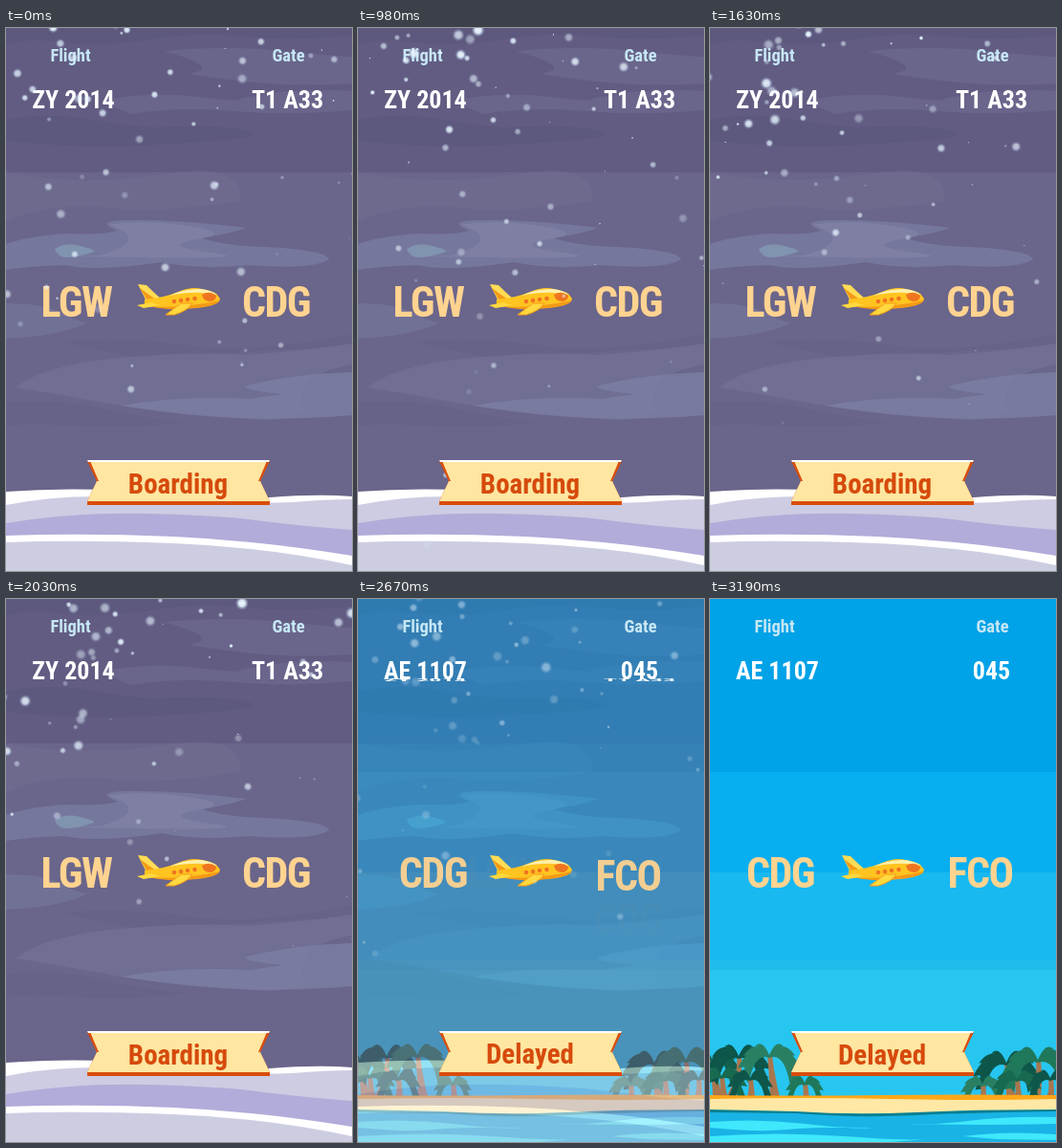
Write an HTML page that moves like this. It is 362 px wide and 568 px high and loops after 4390 ms.

```html
<!DOCTYPE html>
<html lang="en">
<head>
<meta charset="utf-8">
<title>Departures</title>
<style>
  html, body { margin: 0; width: 100%; height: 100%; overflow: hidden; background: #00a2e8; }
  svg { display: block; width: 100%; height: 100%; }
  text {
    font-family: "Roboto Condensed", "Liberation Sans Narrow", Roboto, "Liberation Sans", sans-serif;
    font-weight: 700; font-stretch: 75%; text-anchor: middle;
  }
  .caption { font-size: 18.5px; fill: #c6e7f4; }
  .value { font-size: 26px; fill: #fff; }
  .airport { font-size: 44px; letter-spacing: -1.5px; fill: #ffd390; }
  .status { font-size: 29px; fill: #d64a0c; }
</style>
</head>
<body>
<svg viewBox="0 0 362 568" preserveAspectRatio="none">
  <defs>
    <radialGradient id="flake">
      <stop offset="0" stop-color="#f0faff"/>
      <stop offset=".5" stop-color="#e2f2ff" stop-opacity=".9"/>
      <stop offset=".7" stop-color="#d5eaff" stop-opacity=".4"/>
      <stop offset="1" stop-color="#d5eaff" stop-opacity="0"/>
    </radialGradient>
  </defs>

  <g id="beach">
    <rect width="362" height="182" fill="#00a2e8"/>
    <rect y="181" width="362" height="106" fill="#08aff0"/>
    <rect y="286" width="362" height="92" fill="#18b8f1"/>
    <rect y="377" width="362" height="12" fill="#1fbdec"/>
    <rect y="388" width="362" height="140" fill="#27c6f0"/>
    <g id="palms"></g>
    <path fill="#19b3e6" d="M0 530H362V568H0Z"/>
    <path fill="#3fe8fb" d="M0 547Q50 543 100 549T170 553Q110 552 80 555T0 553ZM0 562Q70 557 140 562T230 565L190 568H0ZM362 542Q310 541 270 546T210 549Q280 551 362 549ZM362 560Q310 556 265 562L300 565 362 566Z"/>
    <path fill="#087f91" d="M0 532H362V536Q280 537 215 540T90 538L0 537Z"/>
    <path fill="#ffe8a5" d="M0 520H362V534Q280 534 215 537T90 536L0 534Z"/>
    <path fill="#ffa719" d="M0 519Q90 520 180 519T362 519V523Q280 525 190 523T0 523Z"/>
  </g>

  <g id="winter">
    <rect width="362" height="568" fill="#6a658a"/>
    <rect width="362" height="151" fill="#625c82"/>
    <path fill="#5b557b" opacity=".6" d="M0 0H362V8Q300 14 250 9T150 12Q100 20 60 15T0 18ZM0 96Q45 88 85 95T155 104Q225 100 255 108T140 123Q70 126 0 118Z"/>
    <path fill="#77749a" opacity=".4" d="M165 24Q230 18 290 24T362 30V58Q300 62 250 56T190 48Q230 42 165 24ZM100 76Q150 66 200 72T245 74Q300 62 362 66V86Q300 92 240 87T130 90Z"/>
    <path fill="#736f93" opacity=".45" d="M0 151Q80 166 165 153T245 181Q160 194 105 188T0 202Z"/>
    <path fill="#797ca2" opacity=".8" d="M0 226Q25 217 66 215 98 217 117 212 91 202 125 201 180 200 251 209 239 214 205 220 230 228 270 229 335 232 338 242 322 253 255 248 200 253 163 245 95 255 61 248 24 249 0 253Z"/>
    <path fill="#8585a9" opacity=".6" d="M108 206Q140 200 190 207T200 221 215 235 140 240 98 238Q125 230 128 222T108 206Z"/>
    <path fill="#859cb6" opacity=".75" d="M51 231Q62 224 78 228T92 234Q78 239 66 240T51 231Z"/>
    <path fill="#777a9f" opacity=".6" d="M0 288Q40 288 58 298T85 308Q60 322 0 325Z"/>
    <path fill="#615c81" opacity=".35" d="M60 328Q120 322 190 332T362 320V334Q250 336 205 345T60 328ZM0 392Q60 388 100 398T190 412Q130 420 70 416T0 418Z"/>
    <path fill="#747297" opacity=".7" d="M10 376Q40 352 120 345T250 342Q310 338 362 330V352Q330 358 318 368T312 402Q290 414 245 408T130 397Q60 384 10 376Z"/>
    <path fill="#7d80a5" opacity=".75" d="M122 395Q180 384 255 388L290 383Q245 379 252 374 300 362 362 360V405Q280 412 210 406Q160 402 122 395Z"/>
    <path fill="#fff" d="M0 485Q80 479 165 487T276 491Q325 487 362 490V520H0Z"/>
    <path fill="#cdcce2" d="M0 499Q45 490 95 490T200 494 300 496Q335 493 362 493V568H0Z"/>
    <path fill="#b1acd9" d="M0 518Q70 506 150 508T270 516Q320 522 362 525V560H0Z"/>
    <path fill="#cdcde2" d="M0 535Q80 532 175 537T362 557V568H0Z"/>
    <path fill="#fff" d="M0 531Q85 528 175 532T362 552V562Q275 543 175 539T0 538Z"/>
  </g>

  <text class="caption" x="67.5" y="35">Flight</text>
  <text class="caption" x="295.5" y="35">Gate</text>
  <g id="labels"></g>

  <g id="plane">
    <path fill="#ffdc55" d="M138 268L147 269Q156 278 162 283L148 288Z"/>
    <path fill="#f49a18" d="M140 272L158 285 149 287Z"/>
    <path fill="#ffc420" d="M145 284Q166 282 180 276T205 273Q220 275 224 283 224 288 210 291 184 296 156 292L145 291Z"/>
    <path fill="#fff0aa" d="M171 280Q187 272 205 273 216 275 221 279 199 274 171 280Z"/>
    <path fill="#f49a18" d="M149 291Q182 294 224 285 220 291 199 293 170 296 149 291Z"/>
    <path fill="#ffd83f" d="M137 290L152 287 161 290 144 293Z"/>
    <path fill="#ffd83f" stroke="#f49a18" stroke-width="1" d="M183 288L195 288Q190 296 176 300L167 300Z"/>
    <path fill="#ef7420" d="M205 279Q213 274 220 280 220 285 214 286 206 286 205 279Z"/>
    <g fill="#ef7420"><circle cx="176" cy="286" r="2.3"/><circle cx="183" cy="285" r="2.3"/><circle cx="190" cy="284" r="2.3"/><circle cx="197.5" cy="283" r="2.3"/></g>
  </g>

  <g id="snow"></g>

  <path fill="#d94d0d" d="M85 452H276L266 474 276 495V499H85V495L95 474Z"/>
  <path fill="#ffe6a1" d="M88 453H273L266 474 276 495H85L95 474Z"/>
  <path fill="#d94d0d" d="M85 453H88L97 474H95ZM276 453H273L264 474H266Z"/>
  <path fill="#fff" d="M85 452H276L275 454H86Z"/>
  <g id="status"></g>
</svg>

<script>
const LOOP = 4390, SWITCH = 2180;
const byId = id => document.getElementById(id);
const clamp = v => Math.min(1, Math.max(0, v));
const easeIn = p => p ** 1.7;
const easeOut = p => 1 - (1 - p) ** 1.7;
const easeInOut = p => p * p * (3 - 2 * p);
const progress = (t, delay, duration) => clamp((t - SWITCH - delay) / duration);

function add(parent, tag, attrs, content = '') {
  const el = document.createElementNS('http://www.w3.org/2000/svg', tag);
  for (const key in attrs) el.setAttribute(key, attrs[key]);
  el.textContent = content;
  return parent.appendChild(el);
}

let seed = 11;
function random() {
  seed = (seed * 16807) % 2147483647;
  return seed / 2147483647;
}

// Palms: a leaning trunk with a fan of drooping leaves
function palm(x, y, r, color, baseX) {
  const g = byId('palms');
  add(g, 'path', { d: `M${x - 2} ${y}Q${x} ${y + 20} ${baseX - 5} 521H${baseX + 5}Q${x + 5} ${y + 20} ${x + 3} ${y}Z`, fill: '#a8764f' });
  let d = '';
  for (let i = 0; i < 9; i++) {
    const a = Math.PI * (1.12 - i * 0.155);
    const ex = x + r * Math.cos(a);
    const ey = y + r * (0.5 - 0.85 * Math.sin(a));
    const mx = (x + ex) / 2;
    d += `M${x} ${y}Q${mx} ${y - r * 0.55} ${ex} ${ey}L${ex * 0.8 + x * 0.2} ${ey - 1}L${ex * 0.7 + x * 0.3} ${ey + 3}Q${mx} ${y - r * 0.1} ${x} ${y + 3}Z`;
  }
  add(g, 'path', { d, fill: color });
}
[
  [2, 481, 30, '#12604e', 8], [30, 478, 34, '#0e564a', 22], [62, 477, 33, '#297f62', 68],
  [12, 499, 27, '#17694f', 14], [42, 501, 24, '#0e564a', 42], [99, 506, 20, '#20785a', 100],
  [310, 485, 35, '#0e564a', 315], [343, 482, 38, '#20785a', 341], [285, 507, 23, '#297f62', 283],
  [321, 502, 26, '#17694f', 322], [356, 501, 24, '#0e564a', 354]
].forEach(p => palm(...p));

// Labels squash past each other (flip) or slide with a fade (slide)
const animated = [];
function label(parent, cls, oldText, newText, x, baseline, middle, update) {
  const make = text => add(byId(parent), 'text', { class: cls, x, y: baseline }, text);
  const before = make(oldText), after = make(newText);
  animated.push(t => update(before, after, t, middle));
}
const squash = (el, middle, dy, scale) =>
  el.setAttribute('transform', `translate(0 ${middle + dy}) scale(1 ${scale}) translate(0 ${-middle})`);
const show = (el, alpha) => el.setAttribute('opacity', alpha);

const flip = offset => (before, after, t, middle) => {
  const p = easeOut(progress(t, 0, 500));
  squash(before, middle, offset * p, 1 - 0.9 * p);
  squash(after, middle, -offset * (1 - p), 0.1 + 0.9 * p);
  show(before, p < 1 ? 1 : 0);
  show(after, p > 0 ? 1 : 0);
};
const slide = (dx, dy) => (before, after, t) => {
  const leaving = progress(t, 0, 500);
  const out = easeIn(leaving), into = easeIn(progress(t, 250, 250));
  before.setAttribute('transform', `translate(${dx * out} ${dy * out})`);
  after.setAttribute('transform', `translate(${dx * (1 - into)} ${dy * (1 - into)})`);
  show(before, 1 - leaving);
  show(after, into);
};
label('labels', 'value', 'ZY 2014', 'AE 1107', 70.5, 84, 75, flip(10));
label('labels', 'value', 'T1 A33', '045', 294.5, 84, 75, flip(10));
label('labels', 'airport', 'LGW', 'CDG', 73.5, 301.5, 286, slide(80, 0));
label('labels', 'airport', 'CDG', 'FCO', 282.5, 301.5, 286, slide(0, 50));
label('status', 'status', 'Boarding', 'Delayed', 180, 486.5, 477, flip(20));

// Snow: born above the stage, mostly on the left, accelerating downwards
const flakes = Array.from({ length: 290 }, (_, i) => {
  const angle = Math.PI * (0.75 + 0.5 * random());
  const speed = 20 + 200 * (random() - 0.5);
  return {
    el: add(byId('snow'), 'circle', { fill: 'url(#flake)' }),
    birth: -4400 + i * 26,
    life: 2.5 + 1.5 * random(),
    x: 10 + 340 * random() ** 1.9,
    y: -70 + 50 * random(),
    vx: speed * Math.cos(angle),
    vy: speed * Math.sin(angle),
    size: 1.5 + 6 * random(),
    alpha: 1.2 - 0.6 * random()
  };
});
function drawSnow(t) {
  for (const f of flakes) {
    const age = (t - f.birth) / 1000;
    const alive = age >= 0 && age < f.life;
    show(f.el, alive ? clamp(f.alpha - 0.15 * age) : 0);
    if (!alive) continue;
    f.el.setAttribute('cx', f.x + f.vx * age + 5 * age * age);
    f.el.setAttribute('cy', f.y + f.vy * age + 35 * age * age);
    f.el.setAttribute('r', Math.max(1, f.size - 0.5 * age));
  }
}

function frame() {
  const t = performance.now() % LOOP;
  const winter = 1 - easeInOut(progress(t, 0, 1000));
  show(byId('winter'), winter);
  show(byId('snow'), winter);
  drawSnow(t);
  animated.forEach(update => update(t));
  requestAnimationFrame(frame);
}
frame();
</script>
</body>
</html>
```
